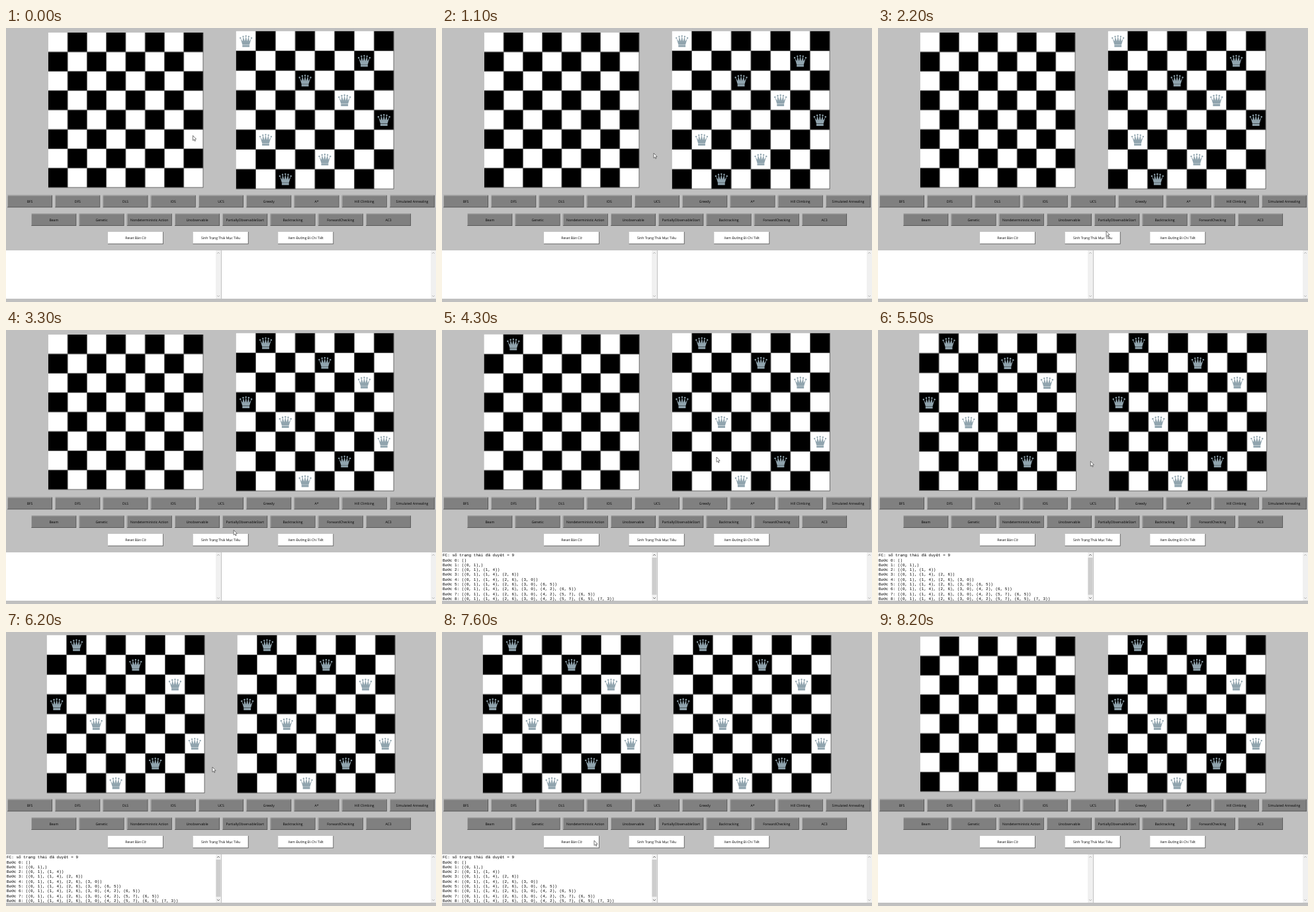
An HTML page with a canvas for the animation above (9 s loop, 650 by 414 pixels).

```html
<!DOCTYPE html>
<html lang="vi">
<head>
<meta charset="utf-8">
<style>
html, body { margin: 0; height: 100%; overflow: hidden; background: #c0c0c0; }
canvas { display: block; }
</style>
</head>
<body>
<canvas id="stage" width="650" height="414"></canvas>
<script>
const ctx = document.getElementById('stage').getContext('2d');
const LOOP = 9000, STEP = 100;
const GOAL_AT = 2800, TEXT_AT = 3900, FIRST_QUEEN = 4200, QUEEN_GAP = 250, RESET_AT = 7700;

const searchButtons = ['BFS', 'DFS', 'DLS', 'IDS', 'UCS', 'Greedy', 'A*', 'Hill Climbing', 'Simulated Annealing'];
const otherButtons = ['Beam', 'Genetic', 'Nondeterministic Action', 'Unobservable',
  'PartiallyObservableStart', 'Backtracking', 'ForwardChecking', 'AC3'];
const actionButtons = ['Reset Bàn Cờ', 'Sinh Trạng Thái Mục Tiêu', 'Xem Đường Đi Chi Tiết'];

// Mouse stops: time, x, y
const mouseStops = [
  [0, 282.5, 162.5], [200, 424, 219], [400, 310, 200], [700, 310, 200], [1100, 320, 189],
  [1800, 320, 189], [2200, 345, 307], [2800, 325, 317], [3100, 185, 316], [3800, 510, 288],
  [4300, 415, 192], [5100, 335, 190], [6200, 312, 204], [7400, 230, 315],
  [7700, 230, 315], [8100, 625, 330]
];

// Eight queens: all solutions in lexicographic order, each queen as [row, column]
const eight = [...Array(8).keys()];
const isSafe = (queens, row, col) =>
  queens.every(([r, c]) => c !== col && Math.abs(c - col) !== Math.abs(r - row));

function solve(queens = []) {
  const row = queens.length;
  if (row === 8) return [queens];
  return eight.flatMap(col => isSafe(queens, row, col) ? solve([...queens, [row, col]]) : []);
}

// Forward checking fills the row with the fewest free columns first
function searchOrder(solution) {
  const queens = [], rows = [...eight];
  const freeColumns = row => eight.filter(col => isSafe(queens, row, col)).length;
  while (rows.length) {
    const row = rows.reduce((best, r) => freeColumns(r) < freeColumns(best) ? r : best);
    rows.splice(rows.indexOf(row), 1);
    queens.push(solution[row]);
  }
  return queens;
}

const solutions = solve();
const firstGoal = solutions[2], secondGoal = solutions[5];
const order = searchOrder(secondGoal);
const placed = n => order.slice(0, n).sort((a, b) => a[0] - b[0]);

function rect(x, y, w, h, color) {
  ctx.fillStyle = color;
  ctx.fillRect(x, y, w, h);
}

function path(points, dx, dy) {
  ctx.beginPath();
  points.forEach(([x, y]) => ctx.lineTo(dx + x, dy + y));
  ctx.closePath();
}

function drawQueen(x, y) {
  ctx.fillStyle = '#90a4ae';
  const outline = [[-5.4, 5.4]];
  for (let i = -2; i <= 2; i++) {
    const tip = [i * 4.2, -7.6 + i * i * 0.75];
    outline.push(tip);
    if (i < 2) outline.push([(i + 0.5) * 3.4, 0.6]);
    ctx.beginPath();
    ctx.arc(x + tip[0], y + tip[1], 1.2, 0, 7);
    ctx.fill();
  }
  path([...outline, [5.4, 5.4]], x, y);
  ctx.fill();
  ctx.fillRect(x - 5.4, y + 5.8, 10.8, 3.2);
}

// Rows and columns holding a queen are slightly larger
function edges(center, used) {
  const sizes = eight.map(i => used.has(i) ? 29.8 : 29.27);
  let pos = center - sizes.reduce((a, b) => a + b) / 2;
  return [pos, ...sizes.map(s => pos += s)];
}

function drawBoard(center, queens) {
  const xs = edges(center, new Set(queens.map(q => q[1])));
  const ys = edges(124, new Set(queens.map(q => q[0])));
  const width = xs[8] - xs[0], height = ys[8] - ys[0];
  rect(xs[0], ys[0], width, height, '#fff');
  for (const r of eight) {
    for (const c of eight) {
      if ((r + c) % 2) rect(xs[c], ys[r], xs[c + 1] - xs[c], ys[r + 1] - ys[r], '#000');
    }
  }
  for (let i = 1; i <= 8; i++) {
    rect(xs[i] - 0.6, ys[0], 1, height, '#666');
    rect(xs[0], ys[i] - 0.6, width, 1, '#666');
  }
  for (const [r, c] of queens) {
    drawQueen((xs[c] + xs[c + 1]) / 2, (ys[r] + ys[r + 1]) / 2);
  }
}

function drawButtons(labels, x0, y, pitch, w, color) {
  const h = 18.5;
  ctx.font = '5.1px "Open Sans", "Noto Sans", sans-serif';
  ctx.textAlign = 'center';
  ctx.textBaseline = 'middle';
  labels.forEach((label, i) => {
    const x = x0 + i * pitch;
    rect(x, y, w, h, '#505050');
    rect(x, y, w - 0.8, h - 0.8, color);
    rect(x, y, w - 0.8, 0.7, '#ffffff80');
    rect(x, y, 0.7, h - 0.8, '#ffffff80');
    ctx.fillStyle = '#000';
    ctx.fillText(label, x + w / 2, y + h / 2 + 0.5);
  });
}

function drawPanel(x, w, full) {
  rect(x, 336, w, 73, '#fff');
  const bar = x + w - 8;
  rect(bar, 336, 8, 73, '#f0f0f0');
  if (full) rect(bar + 0.5, 344, 7, 56, '#cdcdcd');
  ctx.strokeStyle = full ? '#606060' : '#b0b0b0';
  ctx.lineWidth = 0.8;
  for (const [y, d] of [[339, 2], [406, -2]]) {
    ctx.beginPath();
    ctx.moveTo(bar + 2, y + d);
    ctx.lineTo(bar + 4, y);
    ctx.lineTo(bar + 6, y + d);
    ctx.stroke();
  }
}

function drawLog() {
  ctx.font = '6px "Liberation Mono", monospace';
  ctx.textAlign = 'left';
  ctx.textBaseline = 'alphabetic';
  ctx.fillStyle = '#000';
  ctx.fillText('FC: số trạng thái đã duyệt = 9', 1, 342.2);
  for (let n = 0; n <= 8; n++) {
    const pairs = placed(n).map(q => `(${q.join(', ')})`).join(', ');
    ctx.fillText(`Bước ${n}: (${pairs}${n === 1 ? ',' : ''})`, 1, 349.5 + n * 7.3);
  }
}

function drawMouse(t) {
  const i = mouseStops.findIndex(stop => stop[0] > t);
  if (i < 0) return;
  const [t0, x0, y0] = mouseStops[i - 1], [t1, x1, y1] = mouseStops[i];
  const k = (t - t0) / (t1 - t0), ease = k * (2 - k);
  path([[0, 0], [0, 7.5], [1.7, 6], [2.8, 8.5], [4, 8], [2.9, 5.6], [5.1, 5.4]],
    x0 + (x1 - x0) * ease, y0 + (y1 - y0) * ease);
  ctx.fillStyle = '#fff';
  ctx.fill();
  ctx.strokeStyle = '#444';
  ctx.lineWidth = 0.7;
  ctx.stroke();
}

function draw(now) {
  const t = Math.floor(now % LOOP / STEP) * STEP;
  const running = t >= TEXT_AT && t < RESET_AT;
  const steps = Math.floor((t - FIRST_QUEEN) / QUEEN_GAP) + 1;
  const count = running ? Math.max(0, Math.min(8, steps)) : 0;

  rect(0, 0, 650, 414, '#c0c0c0');
  drawBoard(181, placed(count));
  drawBoard(467 + count / 4, t < GOAL_AT ? firstGoal : secondGoal);
  drawButtons(searchButtons, 2, 252.7, 72.25, 68, '#808080');
  drawButtons(otherButtons, 38.3, 280.5, 72.25, 68, '#808080');
  drawButtons(actionButtons, 154, 308, 128.6, 84, '#fff');
  drawPanel(0, 325, running);
  drawPanel(326, 324, false);
  if (running) drawLog();
  drawMouse(t);
}

ctx.textRendering = 'geometricPrecision';
const start = performance.now();
function tick() {
  draw(performance.now() - start);
  requestAnimationFrame(tick);
}
tick();
</script>
</body>
</html>
```
